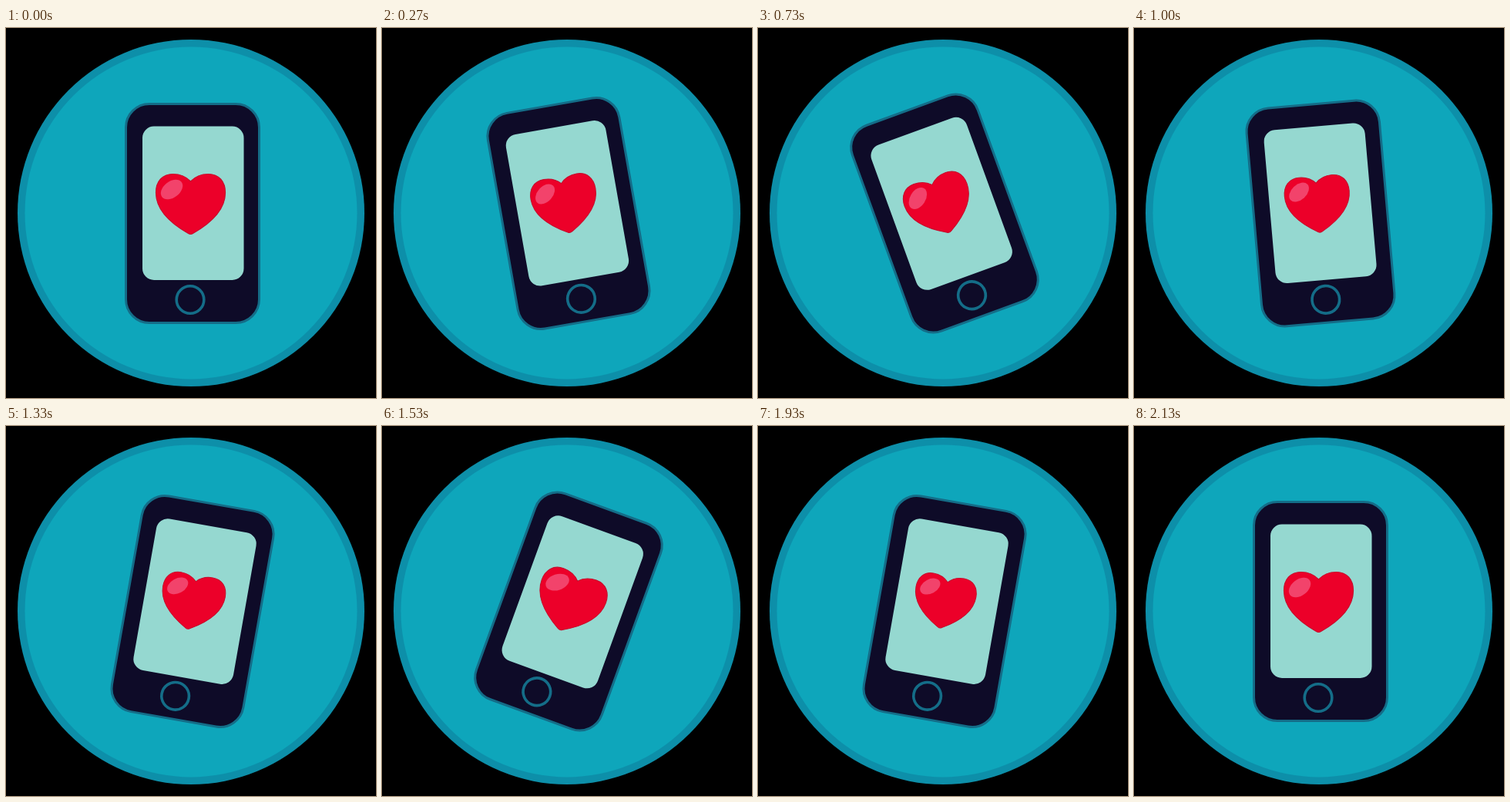
Recreate the animation shown at these times as an HTML page. Size 480x480 px, loop 2.34 s.

```html
<!DOCTYPE html>
<html lang="en">
<head>
<meta charset="utf-8">
<title>Ringing phone with a beating heart</title>
<style>
  html, body { margin: 0; width: 100%; height: 100%; overflow: hidden; background: #000; }
  svg { display: block; width: 100%; height: 100%; }
</style>
</head>
<body>
<svg viewBox="0 0 480 480">
  <circle cx="240" cy="240" r="225" fill="#0d8fa9"/>
  <circle cx="240" cy="240" r="215.5" fill="#0ea6bb"/>
  <g id="phone">
    <rect x="155.5" y="98.5" width="173" height="284" rx="30.5" fill="#0e0b28" stroke="#146d88" stroke-width="3"/>
    <rect x="177" y="127.5" width="131.5" height="199.5" rx="15" fill="#95d8d0"/>
    <circle cx="239" cy="352.5" r="17.8" fill="none" stroke="#146d88" stroke-width="3.6"/>
    <g id="heart">
      <path d="M0-29.5C6-36 14-39 23-39C37-39 45-29 45-15C45 9 24 26 3 38Q0 40 -3 38C-24 26 -45 9 -45-15C-45-29 -37-39 -23-39C-14-39 -6-36 0-29.5Z"
            fill="#ec0029" stroke="#c90a2c" stroke-width="1.2"/>
      <ellipse rx="16" ry="10.5" transform="translate(-24.5 -19) rotate(-38)" fill="#f2436b"/>
    </g>
  </g>
</svg>
<script>
  const LOOP = 2340, FPS = 15, POSES = 20, FRAMES_PER_POSE = 1.6;
  const STEP = 5, SWING = 5, BEATS = 3;
  const BEAT = [[0, 1], [0.35, 0.935], [0.45, 0.84], [0.52, 0.82], [0.8, 0.91], [1, 1]];
  const phone = document.getElementById('phone');
  const heart = document.getElementById('heart');

  function interpolate(keys, x) {
    const i = keys.findIndex(([at], k) => k > 0 && x <= at);
    const [x0, y0] = keys[i - 1], [x1, y1] = keys[i];
    return y0 + (y1 - y0) * (x - x0) / (x1 - x0);
  }

  // Left, across to the right, then upright, in equal angular steps.
  function tilt(pose) {
    if (pose <= SWING) return -pose * STEP;
    if (pose <= 3 * SWING) return (pose - 2 * SWING) * STEP;
    return (POSES - pose) * STEP;
  }

  function draw(ms) {
    const frame = Math.floor((ms % LOOP + 4) * FPS / 1000);
    const pose = Math.min(POSES, Math.floor(frame / FRAMES_PER_POSE));
    const scale = interpolate(BEAT, pose * BEATS / POSES % 1);
    phone.setAttribute('transform', `rotate(${tilt(pose)} 242 240.5)`);
    heart.setAttribute('transform', `translate(239.5 228.5) scale(${scale})`);
  }

  const start = performance.now();
  function tick() {
    draw(performance.now() - start);
    requestAnimationFrame(tick);
  }
  tick();
</script>
</body>
</html>
```
